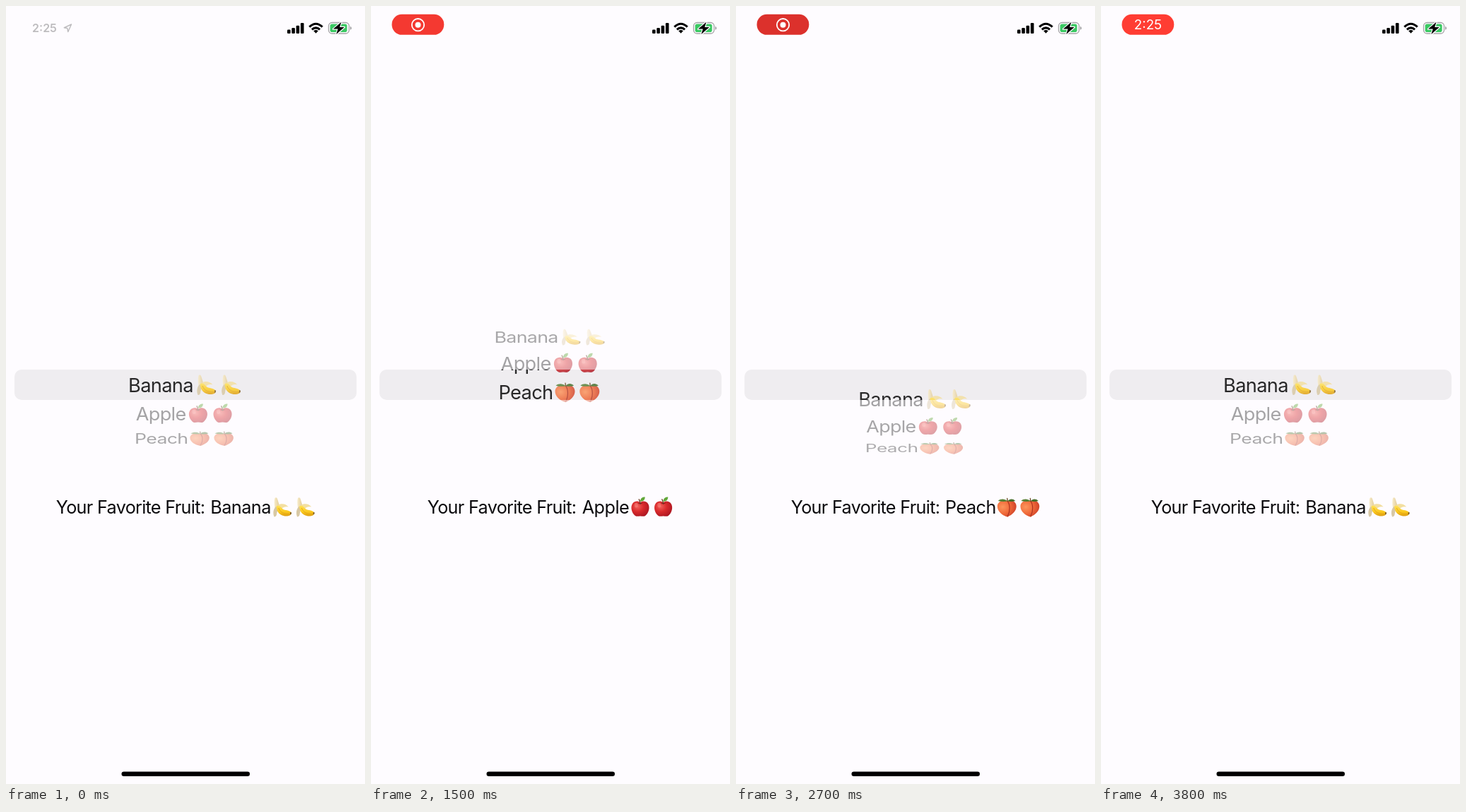
Animation of 508 by 1102 pixels, one loop 3.9 s. Source, as an HTML page:

```html
<!DOCTYPE html>
<html lang="en">
<head>
<meta charset="utf-8">
<title>Fruit picker</title>
<style>
  html, body { margin: 0; width: 100%; height: 100%; overflow: hidden; background: #fefcff; }
  svg { display: block; width: 100%; height: 100%; }
  text { font-family: Inter, Roboto, "Liberation Sans", sans-serif; font-optical-sizing: none; text-anchor: middle; }
  .row text { font-size: 27.2px; letter-spacing: -.024em; }
  #label text { font-size: 25.2px; fill: #0b0a0d; letter-spacing: -.02em; }
  #label .prefix { letter-spacing: -.027em; }
  #dim text { opacity: .36; }
  #dim .fruit { opacity: .42; }
  #bright { opacity: .83; }
</style>
</head>
<body>
<svg viewBox="0 0 508 1102" preserveAspectRatio="none">
  <defs>
    <radialGradient id="red" cx=".35" cy=".35" r=".75">
      <stop offset="0" stop-color="#f2605a"/><stop offset=".45" stop-color="#d92a2c"/><stop offset="1" stop-color="#a81420"/>
    </radialGradient>
    <radialGradient id="orange" cx=".28" cy=".4" r=".8">
      <stop offset="0" stop-color="#fb955c"/><stop offset=".5" stop-color="#f06a3a"/><stop offset="1" stop-color="#c93a26"/>
    </radialGradient>
    <linearGradient id="yellow" x2="0" y2="1">
      <stop offset="0" stop-color="#ffe25a"/><stop offset=".6" stop-color="#fbc81d"/><stop offset="1" stop-color="#dd9c10"/>
    </linearGradient>
    <linearGradient id="flesh" x2="1">
      <stop offset="0" stop-color="#f8ecc8"/><stop offset="1" stop-color="#dfc895"/>
    </linearGradient>

    <!-- fruits sit in a 28 unit box around 0,0 -->
    <g id="banana">
      <path d="M-10.500 1C-11.500-5-11.500-10-10.500-13.500Q-8.500-15.500-7-13C-5.500-9-4.500-5-3 0Z" fill="url(#flesh)"/>
      <path d="M-9-1C-13 3-13.500 9-11.500 14Q-9 14.500-8 11.500C-7.500 7-6.500 4-5 2Z" fill="#d8c8a4"/>
      <path d="M-6-3C-1-6.500 6-5 9.500-.5C5-1.500 2-.5 0 2Z" fill="#f3dfa0"/>
      <path d="M-8-2C-4-3.500-2-1 0 1.500C3 5 8 3 13 7Q14.500 9.500 12.500 11.500C6 15-3 12.500-6.500 6C-8 3-8.500 0-8-2Z" fill="url(#yellow)"/>
      <path d="M-5 1C-2.500 8 4 10.500 11.500 9.500" fill="none" stroke="#e5a815"/>
      <path d="M12.300 7l1.900.8-.5 2.400-1.900.8Z" fill="#7d5a22"/>
    </g>
    <g id="apple">
      <path d="M0-7C3-9.500 8-9.500 11-6C15.500 0 12 9 7.500 12.500C5 14.200 2.500 13 0 13S-5 14.200-7.500 12.500C-12 9-15.500 0-11-6C-8-9.500-3-9.500 0-7Z" fill="url(#red)"/>
      <path d="M-4-6.200Q0-3.600 4-6.200Q0-7.600-4-6.200Z" fill="#8f1620"/>
      <path d="M0-5Q-.3-9-1.800-11.500" fill="none" stroke="#6b4022" stroke-width="1.500" stroke-linecap="round"/>
      <path d="M0-8.500C0-13 3-15 7-15C7-11 4.500-8.300 0-8.500Z" fill="#62a83a"/>
      <ellipse cx="-6" cy="-3" rx="2.600" ry="3.500" fill="#ff9c90" opacity=".4"/>
    </g>
    <g id="peach">
      <path d="M1-9C7-12.500 14-8 14-1.500C14 6 8 11 1 14.200C-7 12-14 6.500-14-1.500C-14-8-6-12.500 1-9Z" fill="url(#orange)"/>
      <path d="M1-9C5-4 5 6 1 13.500" fill="none" stroke="#a83020" stroke-width="1.200"/>
      <path d="M1-9C-4-13-9-12.500-13-9.500C-8-8-3-8 1-9Z" fill="#567f34"/>
      <path d="M1-9C4-13 9-13 12.500-9.500C9-8 5-8 1-9Z" fill="#456f2b"/>
      <path d="M1-9L.5-13" stroke="#6b4a24" stroke-width="1.400" stroke-linecap="round"/>
    </g>
    <clipPath id="inside"><rect y="515" width="508" height="43"/></clipPath>
    <clipPath id="outside"><path d="M0 400H508V515H0ZM0 558H508V680H0Z"/></clipPath>
  </defs>

  <rect width="508" height="1102" fill="#fefcff"/>

  <g id="clock" fill="#000">
    <text x="54.500" y="37" font-size="16" font-weight="600">2:25</text>
    <path d="M92.500 26L82.300 30.800L86.800 31.600L87.800 36.500Z" fill="none" stroke="#000" stroke-width="1.500" stroke-linejoin="round"/>
  </g>
  <g id="pill">
    <rect id="pillBack" x="29.500" y="11.800" width="73.800" height="29" rx="14.200"/>
    <g id="rec">
      <circle cx="66.500" cy="26.700" r="8.700" fill="none" stroke="#fff" stroke-width="1.800"/>
      <circle cx="66.500" cy="26.700" r="4" fill="#fff"/>
    </g>
    <text id="pillTime" x="66.500" y="33.400" font-size="18.800" fill="#fff">2:25</text>
  </g>

  <g id="bars">
    <rect x="398" y="33.500" width="4.600" height="5.500" rx="1.200"/>
    <rect x="404.300" y="31" width="4.600" height="8" rx="1.200"/>
    <rect x="410.600" y="27.700" width="4.600" height="11.300" rx="1.200"/>
    <rect x="416.900" y="24" width="4.600" height="15" rx="1.200"/>
  </g>
  <g fill="none" stroke="#000" stroke-width="3">
    <path d="M429.300 29.600Q438.500 21 447.700 29.600"/>
    <path d="M432.900 33.400Q438.500 28.300 444.100 33.400"/>
    <path d="M435.200 35.300Q438.500 32.800 441.800 35.300L438.500 38.800Z" fill="#000" stroke="none"/>
  </g>
  <rect x="456.500" y="23.500" width="29" height="15.500" rx="4.800" fill="none" stroke="#a5a4a7" stroke-width="1.300"/>
  <path d="M487 28.700Q489 29.200 489 31.200T487 33.800Z" fill="#a5a4a7"/>
  <rect x="458.600" y="25.500" width="24" height="11.500" rx="2.800" fill="#3ac862"/>
  <path d="M474.500 22.800L463 32.600H469.700L467.300 40L478.800 30H472.200Z" stroke="#fefcff" stroke-width="2.400" stroke-linejoin="round" paint-order="stroke"/>

  <rect x="12" y="515" width="484" height="43" rx="10" fill="#efedf0"/>
  <g clip-path="url(#outside)"><g id="dim"></g></g>
  <g clip-path="url(#inside)"><g id="bright"></g></g>
  <g id="label"></g>
  <rect x="163.500" y="1084.500" width="181.500" height="6.600" rx="3.300"/>
</svg>

<script>
const LOOP = 3900, STEP = 100;
const CENTER = 537, RADIUS = 112, ANGLE = 21.2 * Math.PI / 180;

// icon: first picker icon; label: prefix centre, name centre, first icon
const fruits = [
  { name: 'Banana', id: 'banana', icon: 283, label: [176, 332, 390.5] },
  { name: 'Apple', id: 'apple', icon: 272, label: [185, 332, 381] },
  { name: 'Peach', id: 'peach', icon: 274.5, label: [183, 332, 383.3] }
];
const $ = id => document.getElementById(id);

function add(parent, tag, attrs, content) {
  const el = document.createElementNS('http://www.w3.org/2000/svg', tag);
  for (const key in attrs) el.setAttribute(key, attrs[key]);
  if (content) el.textContent = content;
  return parent.appendChild(el);
}

function addIcons(parent, id, x, y, pitch, size) {
  const group = add(parent, 'g', { class: 'fruit' });
  for (let i = 0; i < 2; i++)
    add(group, 'use', { href: '#' + id, transform: `translate(${x + i * pitch} ${y}) scale(${size})` });
}

const rows = ['dim', 'bright'].flatMap(layer => fruits.map((f, i) => {
  const el = add($(layer), 'g', { class: 'row' });
  add(el, 'text', { x: 219 - 254, y: 10 }, f.name);
  addIcons(el, f.id, f.icon - 254, 0, 34.8, 1);
  return { el, i };
}));

const labels = fruits.map(f => {
  const el = add($('label'), 'g', {});
  const [prefix, name, icon] = f.label;
  add(el, 'text', { x: prefix, y: 719, class: 'prefix' }, 'Your Favorite Fruit:');
  add(el, 'text', { x: name, y: 719 }, f.name);
  addIcons(el, f.id, icon, 710, 32.6, .96);
  return el;
});

const ramp = (t, from, to) => Math.min(1, Math.max(0, (t - from) / (to - from)));
const ease = (t, from, to) => { const x = ramp(t, from, to); return x * x * (3 - 2 * x); };

// two swipes forward, then a fling back that overshoots and settles
const scrollAt = t =>
  ease(t, 300, 950) + ease(t, 1100, 1690) - 2.55 * ease(t, 2130, 2550) + .55 * ease(t, 2550, 3280);

const chosenAt = t => t < 1000 || t >= 3400 ? 0 : t < 1800 ? 1 : 2;

function draw(t) {
  const pos = scrollAt(t);
  for (const { el, i } of rows) {
    const a = (i - pos) * ANGLE, c = Math.max(0, Math.cos(a));
    const y = CENTER + RADIUS * Math.sin(a);
    el.setAttribute('transform', `translate(254 ${y}) scale(${1 - .08 * (1 - c)} ${c})`);
    el.setAttribute('opacity', .7 + .3 * c);
  }
  const chosen = chosenAt(t);
  labels.forEach((el, i) => el.setAttribute('display', i === chosen ? 'inline' : 'none'));

  const glow = .5 - .5 * Math.cos((t - 870) / 1000 * Math.PI);
  const mix = (a, b) => Math.round(a + (b - a) * glow);
  $('pillBack').setAttribute('fill', `rgb(${mix(217, 255)},${mix(48, 61)},${mix(43, 51)})`);
  $('pill').setAttribute('opacity', ramp(t, 0, 250));
  $('clock').setAttribute('opacity', .25 * (1 - ramp(t, 0, 150)));
  $('pillTime').setAttribute('opacity', ramp(t, 3030, 3300));
  $('rec').setAttribute('opacity', 1 - ramp(t, 3030, 3300));
}

const start = performance.now();
function tick() {
  const t = (performance.now() - start) % LOOP;
  draw(Math.floor(t / STEP) * STEP);
  requestAnimationFrame(tick);
}
tick();
</script>
</body>
</html>
```
